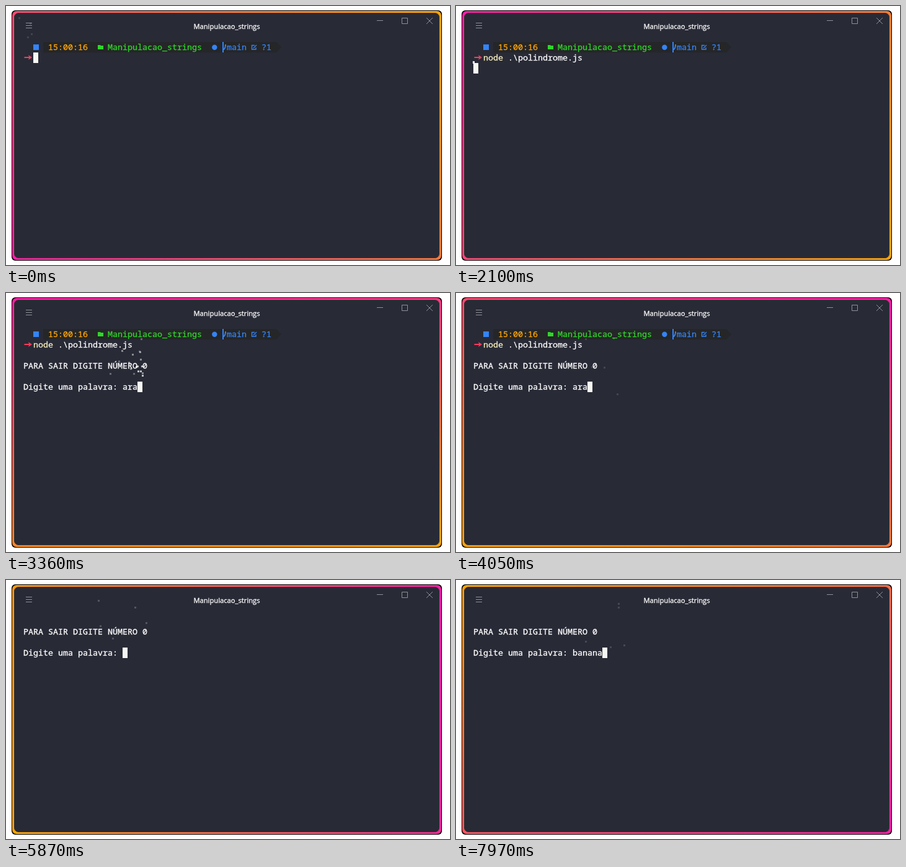
An HTML page with a canvas that plays this animation: 716 by 418 pixels, repeating every 8 s.

```html
<!DOCTYPE html>
<html lang="pt">
<head>
<meta charset="utf-8">
<title>Terminal</title>
<style>
  html, body { margin: 0; width: 100%; height: 100%; overflow: hidden; background: #fff; }
  #stage { position: relative; width: 716px; height: 418px; overflow: hidden; }
  #stage > * { position: absolute; box-sizing: border-box; }
  #edge { left: 9px; top: 7px; width: 694px; height: 404px; border-radius: 6px; background: #000; }
  #glow { left: 10px; top: 8px; width: 692px; height: 402px; border-radius: 7px; }
  #window { left: 13px; top: 11px; width: 686px; height: 396px; border-radius: 7px;
    background: #282a36; border: 1px solid #333; }
  svg, canvas { left: 0; top: 0; }
  text { white-space: pre; fill: #fff; stroke: #fff; stroke-width: 0.3px; }
  .mono { font: 500 13.333px "Noto Sans Mono", "DejaVu Sans Mono", monospace; }
  .title { font: 500 11.2px "Open Sans", "Noto Sans", sans-serif; text-anchor: middle; }
  .line { fill: none; stroke: #8f9098; stroke-width: 1; }
  .blue { fill: #3484f7; stroke: #3484f7; }
  .green { fill: #2fd62b; stroke: #2fd62b; }
  .amber { fill: #ffa50a; stroke: #ffa50a; }
  .cream { fill: #f8efbf; stroke: #f8efbf; }
  .solid { stroke: none; }
  .outline { fill: none; }
</style>
</head>
<body>
<div id="stage">
  <div id="edge"></div>
  <div id="glow"></div>
  <div id="window"></div>
  <svg width="716" height="418">
    <path class="line" d="M32 27.5h10M32 31.5h10M32 35.5h10M598 23.5h10M638.5 19.5h9v9h-9zM678 19l10 10M688 19l-10 10"/>
    <text class="title" x="356" y="37">Manipulacao_strings</text>
    <g id="prompt" class="mono">
      <path fill="#252628" d="M60 58H436L444 66.5L436 75H60z"/>
      <rect class="blue solid" x="44" y="62" width="9" height="9"/>
      <text class="amber" x="68" y="71">15:00:16</text>
      <path class="green solid" d="M148 63h4l1 1h4v6h-9z"/>
      <text class="green" x="164" y="71">Manipulacao_strings</text>
      <circle class="blue solid" cx="336.3" cy="66.7" r="4.2"/>
      <path class="blue outline" stroke-width="2" d="M350 58V75M350 71Q354 69 354 62"/>
      <text class="blue" x="356" y="71">main</text>
      <path class="blue outline" stroke-width="1.4" d="M401 63.5h-4.500v6.500h6.500v-3M399 68l5-5"/>
      <text class="blue" x="412" y="71">?1</text>
      <path d="M29.500 83H38" stroke="#fb3b5c" stroke-width="2"/>
      <path fill="#fb3b5c" d="M36 79L42 83L36 87L37.500 83z"/>
      <g id="command">
        <text class="cream" x="44" y="88">node</text>
        <text x="84" y="88">.\polindrome.js</text>
      </g>
    </g>
    <g id="output" class="mono">
      <text x="28" y="122">PARA SAIR DIGITE NÚMERO 0</text>
      <text x="28" y="156">Digite uma palavra: <tspan id="word"></tspan></text>
    </g>
    <rect id="cursor" width="8" height="17" fill="#f8f8f2"/>
  </svg>
  <canvas id="sparks" width="716" height="418"></canvas>
</div>
<script>
const LOOP = 8000, STEP = 70, TICK = 1000 / 60;
const GRAVITY = 0.075, FADE = 0.96;
const RECALL = 395, ENTER = 2090, ASK = 2200, CLEAR = 5220;
const el = id => document.getElementById(id);
const ctx = el('sparks').getContext('2d');

// Every cursor move: when, the cell it lands on, and the word typed so far
const moves = [];
const move = (at, column, row, word = '') => moves.push({ at, column, row, word });

function type(text, start, interval, row, before = '') {
  for (let i = 0; i < text.length; i++) {
    const word = before + text.slice(0, i + 1);
    move(start + i * interval, 20 + word.length, row, word);
  }
}

move(-860, 2, 1);
move(RECALL, 22, 1);
move(ENTER, 0, 2);
move(ASK, 20, 5);
type('ara', 2870, 174, 5);
type('ra', 4200, 200, 5, 'ara');
move(CLEAR, 20, 3);
type('banana', 6200, 118, 3);
move(7187, 26, 3, 'banana');

const cellX = column => 28 + 8 * column;
const cellY = row => 58 + 17 * row;

let seed = 11;
const random = () => (seed = seed * 16807 % 2147483647) / 2147483647;

for (const m of moves) {
  m.sparks = Array.from({ length: 5 + Math.floor(random() * 4) }, () => ({
    vx: random() * 2 - 1,
    vy: random() * 2 - 3.5
  }));
}

function drawSparks(t) {
  ctx.clearRect(0, 0, 716, 418);
  for (const { at, column, row, sparks } of moves) {
    const n = (t - at) / TICK, alpha = FADE ** n;
    if (n < 0 || alpha < 0.1) continue;
    ctx.fillStyle = `rgba(255,255,255,${alpha})`;
    for (const { vx, vy } of sparks) {
      const x = cellX(column) + vx * n;
      const y = cellY(row) + vy * n + GRAVITY / 2 * n * (n + 1);
      ctx.fillRect(Math.round(x - 1), Math.round(y - 1), 3, 3);
    }
  }
}

const show = (id, on) => el(id).setAttribute('visibility', on ? 'inherit' : 'hidden');

function drawText(t) {
  const cleared = t >= CLEAR;
  const { column, row, word } = moves.filter(m => m.at <= t).pop();
  show('prompt', !cleared);
  show('command', !cleared && t >= RECALL);
  show('output', t >= ASK);
  el('output').setAttribute('transform', `translate(0 ${cleared ? -34 : 0})`);
  el('word').textContent = word;
  el('cursor').setAttribute('x', cellX(column));
  el('cursor').setAttribute('y', cellY(row));
}

// The picture advances in steps, with one longer pause before 4050 ms
function stepped(t) {
  if (t >= 4050) return 4050 + Math.floor((t - 4050) / STEP) * STEP;
  return Math.min(3850, Math.floor(t / STEP) * STEP);
}

const origin = performance.now();
function frame() {
  const t = stepped((performance.now() - origin) % LOOP);
  el('glow').style.background = `linear-gradient(${50 + t * 0.036}deg, #fc1da7, #fba506)`;
  drawText(t);
  drawSparks(t);
  requestAnimationFrame(frame);
}
frame();
</script>
</body>
</html>
```
